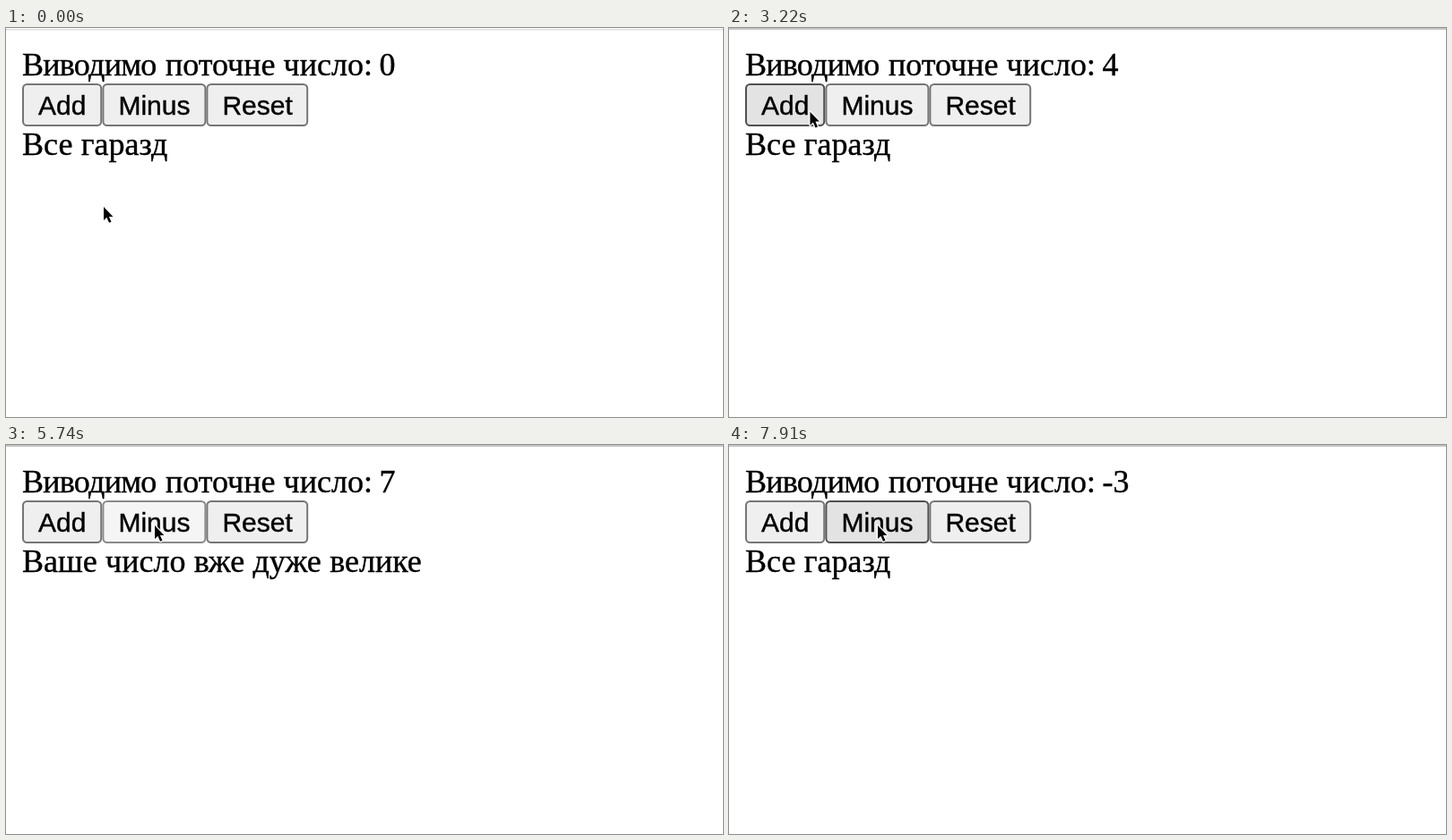
These frames come from a looping animation (800x435 px, 8000 ms). An HTML page:

```html
<!DOCTYPE html>
<html lang="uk">
<head>
<meta charset="utf-8">
<title>Counter</title>
<style>
  html, body { margin: 0; width: 100%; height: 100%; overflow: hidden; background: #fff; }
  svg { display: block; }
  text { stroke: #000; stroke-width: .4px; }
  .serif { font: 36px "Liberation Serif", "Times New Roman", serif; }
  .label { font: 30px "Liberation Sans", Arial, sans-serif; }
  .tight { letter-spacing: -.02em; }
  #status { word-spacing: .4px; }
</style>
</head>
<body>
<svg width="800" height="435" viewBox="0 0 800 435">
  <rect id="edge" width="800"/>
  <text class="serif" y="53"><tspan class="tight" x="18">Виводимо</tspan><tspan x="178">поточне</tspan><tspan x="309.6">число:</tspan><tspan id="count" x="416.6">0</tspan></text>
  <g id="buttons"></g>
  <text id="status" class="serif" x="18" y="142"></text>
  <path id="cursor" d="M0 0V15L3.4 11.8L6 17.8L8.5 16.7L5.9 10.9H10.4Z"
    stroke="#fff" stroke-width="2.4" stroke-linejoin="round" paint-order="stroke"/>
</svg>
<script>
const LOOP = 8000, STEP = 70, HOLD = 100;
const $ = id => document.getElementById(id);

const looks = {
  idle: ['#efefef', '#767676'],
  hover: ['#e3e3e3', '#505050'],
  active: ['#f5f5f5', '#8a8a8a']
};

// Evenly paced clicks; each time is a release, HOLD ms after the press.
const burst = (first, period, count) => Array.from({ length: count }, (_, i) => first + i * period);
const addClicks = [...burst(2240, 257, 4), ...burst(3500, 350, 5)];
const minusClicks = burst(5390, 223, 12);

const rest = { x: 109, y: 200 }, onAdd = { x: 90.5, y: 93.7 }, onMinus = { x: 166, y: 90 };

const buttons = [['Add', 18, 89.2, addClicks], ['Minus', 107.4, 116, minusClicks], ['Reset', 223.4, 113.8, []]]
  .map(([name, x, width, clicks]) => {
    const make = (tag, attrs) => {
      const el = document.createElementNS('http://www.w3.org/2000/svg', tag);
      for (const key in attrs) el.setAttribute(key, attrs[key]);
      return $('buttons').appendChild(el);
    };
    const box = make('rect', { x: x + 1, y: 63, width: width - 2, height: 46, rx: 4.5, 'stroke-width': 2 });
    make('text', { x: x + 18, y: 97, class: 'label' }).textContent = name;
    return { x, width, clicks, box };
  });

function glide(t, begin, end, from, to) {
  const u = Math.min(1, Math.max(0, (t - begin) / (end - begin)));
  const k = u * u * (3 - 2 * u);
  return { x: from.x + (to.x - from.x) * k, y: from.y + (to.y - from.y) * k };
}

const pointerAt = t => t < 5000
  ? glide(t, 0, 700, rest, onAdd)
  : glide(t, 4970, 5250, onAdd, onMinus);

const released = (clicks, t) => clicks.filter(c => c <= t).length;
const pressed = (clicks, t) => clicks.some(c => c - HOLD <= t && t < c);

function render(time) {
  const t = Math.floor(time % LOOP / STEP) * STEP;
  const { x, y } = pointerAt(t);
  const value = released(addClicks, t) - released(minusClicks, t);

  $('cursor').setAttribute('transform', `translate(${x} ${y})`);
  $('count').textContent = value;
  $('status').textContent = value > 5 ? 'Ваше число вже дуже велике' : 'Все гаразд';

  for (const b of buttons) {
    const over = x >= b.x && x < b.x + b.width && y >= 62 && y < 110;
    const [fill, stroke] = looks[pressed(b.clicks, t) ? 'active' : over ? 'hover' : 'idle'];
    b.box.setAttribute('fill', fill);
    b.box.setAttribute('stroke', stroke);
  }

  const focused = t >= STEP;
  $('edge').setAttribute('y', focused ? 0 : 1);
  $('edge').setAttribute('height', focused ? 2 : 1.5);
  $('edge').setAttribute('fill', focused ? '#c6c6c6' : '#e0e0e0');
}

const start = performance.now();
function frame() {
  render(performance.now() - start);
  requestAnimationFrame(frame);
}
frame();
</script>
</body>
</html>
```
